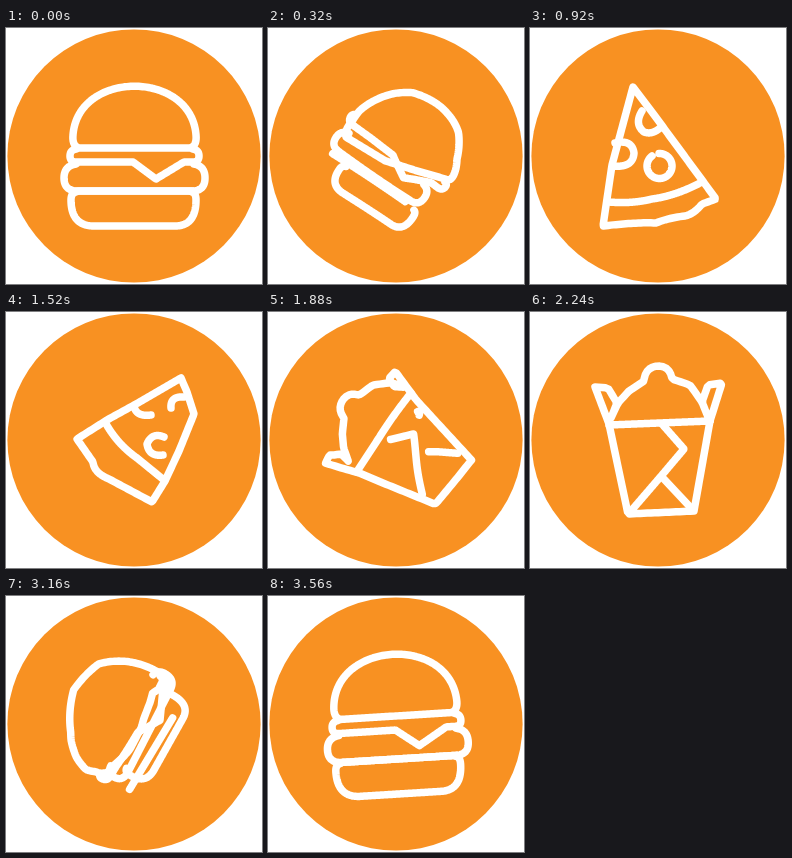
Write an HTML page with a canvas that moves like this. It is 256 px wide and 256 px high and loops after 3600 ms.

```html
<!DOCTYPE html>
<html>
<head>
<meta charset="utf-8">
<style>
html, body { margin: 0; height: 100%; overflow: hidden; background: #fff; }
canvas { display: block; width: 256px; height: 256px; }
</style>
</head>
<body>
<canvas id="stage" width="256" height="256"></canvas>
<script>
const LOOP = 3600, STEP = 40, POINTS = 160, C = 128;
const ctx = document.getElementById('stage').getContext('2d');

// Each icon turns half a revolution while it becomes the next one.
const TURNS = [[0, 1110], [1140, 2330], [2340, 3680]];
const ease = u => (1 - Math.cos(Math.PI * Math.min(1, Math.max(0, u)))) / 2;
const angleAt = t => TURNS.reduce((sum, [a, b]) => sum + Math.PI * ease((t - a) / (b - a)), 0);

function rotate([x, y], angle) {
  const c = Math.cos(angle), s = Math.sin(angle);
  return [x * c - y * s, x * s + y * c];
}

// Evenly spaced points along a path, turned back to the upright frame.
function sample(d, angle) {
  const path = document.createElementNS('http://www.w3.org/2000/svg', 'path');
  path.setAttribute('d', d);
  const length = path.getTotalLength();
  return Array.from({ length: POINTS + 1 }, (_, i) => {
    const p = path.getPointAtLength(length * i / POINTS);
    return rotate([p.x - C, p.y - C], -angle);
  });
}
const shape = (angle, paths) => paths.map(d => sample(d, angle));

// Strokes in order: outline, crossing line, and three details.
const burger = [
  'M73 120Q66 118 67 107C72 42 185 42 190 107Q191 118 184 120Z',
  'M70 121Q64 122 64 128Q64 134 70 134H127L150 151L178 134H187Q193 134 193 128Q193 122 187 121',
  'M70 136Q58 138 58 150Q58 163 72 163H186Q199 163 199 150Q199 138 188 136',
  'M70 164Q65 165 65 172Q65 198 88 198H169Q190 198 190 172Q190 165 186 164',
  'M72 163H186'
];
const foldedBun = [
  'M69 72L90 77L106 73L130 77L157 79L179 84Q193 107 193 122Q192 145 182 155L153 164L146 174L133 185L122 174L96 153L68 125Z',
  'M160 80L151 106L140 126L136 147L123 173',
  'M127 93Q119 96 119 102Q119 107 124 110',
  'M84 146L91 143Q97 140 96 133',
  'M107 76Q113 81 110 90'
];
const pizza = [
  'M103 59L122 84L186 171L172 176Q164 186 155 188Q138 190 126 195Q108 194 73 198L82 137Z',
  'M170 155Q145 168 122 171Q102 176 79 174',
  'M122 128A12.500 12.500 0 1 0 129 125.500',
  'M85 115Q102 111 104 125Q103 140 83 138',
  'M112 83Q104 96 114 104Q122 107 130 100'
];
const cutSlice = [
  'M175 66L181 80L188 102L173 139L159 169L146 190L103 167Q88 161 87 150L71 127L101 108L130 92Z',
  'M158 168L131 146Q111 132 99 110',
  'M158 125Q146 120 141 132Q143 145 157 143',
  'M128 94Q130 105 145 103',
  'M178 85Q164 84 165 96'
];
const box = [
  'M164 199L98 202L79 112L65 75L78 76L87 91L81 106L88 91L99 79L114 69Q115 55 128 54Q140 54 142 67L160 73L172 90L178 105L172 90L178 73L192 71L180 109Z',
  'M79 113L180 109',
  'M132 112L154 137L132 163L101 199',
  'M132 165L162 197',
  'M178 107L180 109'
];
const collapsedBox = [
  'M88 185L64 147L110 89L121 71L130 77L117 81L130 80L152 86L164 85L188 103Q194 115 186 134L188 142L182 160L193 172L176 180L153 180L144 177Z',
  'M110 89L151 135Q162 146 165 156L179 173',
  'M128 153L100 150L65 147',
  'M94 152L91 171',
  'M183 166L188 171'
];

const cycle = (points, by) => points.map((_, i) => points[(i + by) % POINTS]);
const burgerIn = shape(0, burger);
// The last half turn starts upside down, so dome and band run from the far side.
const [dome, band, ...rest] = shape(3 * Math.PI, burger);
const burgerOut = [cycle(dome, Math.round(POINTS / 3)), band.reverse(), ...rest];
const posed = (t, paths) => shape(angleAt(t), paths);
const pizzaShape = posed(920, pizza), boxShape = posed(2240, box);

const easeIn = u => u ** 1.5, easeOut = u => 1 - (1 - u) ** 1.5;
const KEYS = [
  [0, burgerIn], [120, burgerIn, easeIn],
  [600, posed(600, foldedBun), easeOut],
  [920, pizzaShape], [1200, pizzaShape, easeIn],
  [1520, posed(1520, cutSlice), easeOut],
  [2160, boxShape], [2400, boxShape, easeIn],
  [2800, posed(2800, collapsedBox), easeOut],
  [3400, burgerOut], [LOOP, burgerOut]
];

function draw(t) {
  const next = KEYS.findIndex(key => key[0] > t);
  const [t0, from, curve = u => u] = KEYS[next - 1];
  const [t1, to] = KEYS[next];
  const u = curve((t - t0) / (t1 - t0));

  ctx.clearRect(0, 0, 256, 256);
  ctx.fillStyle = '#f89122';
  ctx.beginPath();
  ctx.arc(C, C, 126.6, 0, 2 * Math.PI);
  ctx.fill();

  ctx.save();
  ctx.translate(C, C);
  ctx.rotate(angleAt(t));
  ctx.strokeStyle = '#fff';
  ctx.lineWidth = 7.5;
  ctx.lineCap = ctx.lineJoin = 'round';
  from.forEach((stroke, s) => {
    ctx.beginPath();
    stroke.forEach(([x, y], i) => {
      const [x2, y2] = to[s][i];
      ctx.lineTo(x + (x2 - x) * u, y + (y2 - y) * u);
    });
    if (s === 0) ctx.closePath();
    ctx.stroke();
  });
  ctx.restore();
}

const start = performance.now();
function tick() {
  const t = (performance.now() - start) % LOOP;
  draw(Math.floor(t / STEP) * STEP);
  requestAnimationFrame(tick);
}
tick();
</script>
</body>
</html>
```
